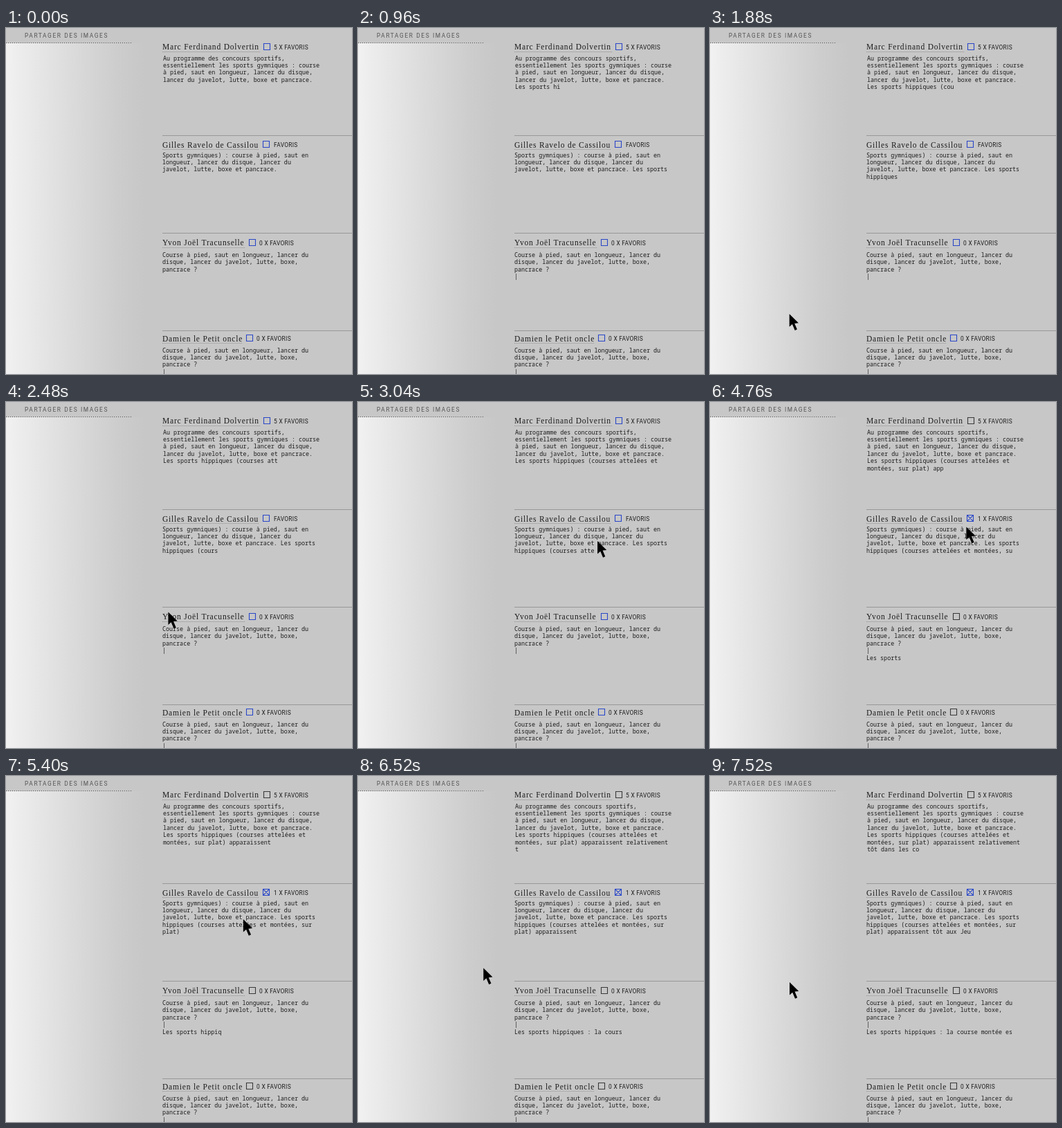
Recreate the animation shown at these times as an HTML page. Size 500x500 px, loop 7560 ms.

```html
<!DOCTYPE html>
<html lang="fr">
<head>
<meta charset="utf-8">
<style>
  html, body { margin: 0; height: 100%; overflow: hidden; background: #c7c7c7; }
  svg { display: block; width: 100vw; height: 100vh; }
  text { white-space: pre; fill: #1c1c1c; }
  .name { font: 11.5px "Liberation Serif", serif; letter-spacing: .8px; }
  .tip { font: 11px "Liberation Serif", serif; letter-spacing: .9px; }
  .label { font: 8.4px Roboto, sans-serif; letter-spacing: .3px; }
  .title { font: 8.4px Roboto, sans-serif; letter-spacing: 1.6px; fill: #555; }
  .body { font: 8.4px "Noto Sans Mono", monospace; }
  .rule { stroke: #989898; }
  .under { stroke: #909090; stroke-dasharray: 1 1; }
  .box { fill: none; stroke-width: 1.1; }
</style>
</head>
<body>
<svg viewBox="0 0 500 500">
  <defs>
    <linearGradient id="fade">
      <stop offset="0" stop-color="#f1f1f1"/>
      <stop offset=".13" stop-color="#ebebeb"/>
      <stop offset=".5" stop-color="#dadada"/>
      <stop offset=".8" stop-color="#cdcdcd"/>
      <stop offset="1" stop-color="#c7c7c7"/>
    </linearGradient>
  </defs>
  <rect y="22" width="200" height="478" fill="url(#fade)"/>
  <path d="M0 21.5H182" stroke="#555" stroke-dasharray="1 2"/>
  <text class="title" x="27" y="14">PARTAGER DES IMAGES</text>
  <g id="posts"></g>
  <g id="tip">
    <rect x="314.7" y="146.7" width="130.6" height="22.6" fill="#d6d6d6" stroke="#2040f4" stroke-width="1.4"/>
    <text class="tip" x="331" y="162.5">Favoris : Gilles R.</text>
  </g>
  <path id="pointer" d="M0 0V18.5L4.2 14.8L8 23.8L11.2 22.3L7.5 13.6L13.2 13Z"/>
</svg>
<script>
const LOOP = 7560, CLICK = 3680, TIP_END = 4680, LINE = 10.45;
const BLUE = '#2b48c8', DARK = '#3a3a3a';
const asked = 'Course à pied, saut en longueur, lancer du\ndisque, lancer du javelot, lutte, boxe,\npancrace ?';

// start and step: when typing begins and ms per character
const posts = [
  { name: 'Marc Ferdinand Dolvertin', y: 31, end: 367, box: 372.5, label: 387, count: '5 X ', x: 227, top: 46.5,
    text: 'Au programme des concours sportifs,\nessentiellement les sports gymniques : course\nà pied, saut en longueur, lancer du disque,\nlancer du javelot, lutte, boxe et pancrace.\n',
    typed: 'Les sports hippiques (courses attelées et\nmontées, sur plat) apparaissent relativement\ntôt dans les co', start: 0, step: 73.7 },
  { name: 'Gilles Ravelo de Cassilou', y: 172.5, end: 366, box: 371.5, label: 387, count: '', x: 226, top: 186.5, liked: true,
    text: 'Sports gymniques) : course à pied, saut en\nlongueur, lancer du disque, lancer du\njavelot, lutte, boxe et pancrace.',
    typed: ' Les sports\nhippiques (courses attelées et montées, sur\nplat) apparaissent tôt aux Jeu', start: 0, step: 86.8 },
  { name: 'Yvon Joël Tracunselle', y: 314, end: 346, box: 351.5, label: 366, count: '0 X ', x: 226, top: 331,
    text: asked, late: '\n|\n', typed: 'Les sports hippiques : la course montée es', start: 3865, step: 85.5 },
  { name: 'Damien le Petit oncle', y: 452.5, end: 342, box: 347.5, label: 362, count: '0 X ', x: 226, top: 468.5,
    text: asked + '\n|', typed: '', start: 0, step: 90 }
];

// pointer tip: time, x, y
const route = [
  [1450, -16, 510], [1600, 18, 486], [1880, 114.5, 413.5], [3040, 346, 201], [3500, 377, 171],
  [3680, 379, 172], [4560, 379, 172], [5400, 343, 207], [6520, 181.5, 277.5], [6860, 99, 291],
  [7100, 101, 293], [7520, 115, 298], [LOOP, 115, 298]
];

const $ = id => document.getElementById(id);
function add(tag, attrs, text = '') {
  const el = document.createElementNS('http://www.w3.org/2000/svg', tag);
  for (const key in attrs) el.setAttribute(key, attrs[key]);
  el.textContent = text;
  return $('posts').appendChild(el);
}

posts.forEach((p, i) => {
  if (i) add('path', { class: 'rule', d: `M226 ${14.5 + 141 * i}H500` });
  add('path', { class: 'under', d: `M226 ${Math.floor(p.y) + 3.5}H${p.end}` });
  add('text', { class: 'name', x: 226, y: p.y }, p.name);
  const top = Math.floor(p.y) - 8.5;
  p.square = add('path', { class: 'box' });
  p.outline = `M${p.box} ${top}h9v9h-9z`;
  p.cross = `${p.outline}l9 9m0 -9l-9 9`;
  p.likes = add('text', { class: 'label', x: p.label, y: p.y - .3 });
  p.lines = Array.from({ length: 7 }, (_, n) =>
    add('text', { class: 'body', x: p.x, y: p.top + n * LINE }));
});

function drawPost(p, t) {
  const clicked = t >= CLICK, checked = clicked && p.liked;
  p.square.setAttribute('d', checked ? p.cross : p.outline);
  p.square.setAttribute('stroke', clicked && !p.liked ? DARK : BLUE);
  p.likes.textContent = (checked ? '1 X ' : p.count) + 'FAVORIS';
  const count = Math.max(0, Math.floor((t - p.start) / p.step));
  const late = p.late && t >= 80 ? p.late : '';
  const lines = (p.text + late + p.typed.slice(0, count)).split('\n');
  p.lines.forEach((el, n) => el.textContent = lines[n] || '');
}

function pointerAt(t) {
  const i = Math.max(1, route.findIndex(k => k[0] > t));
  const [a, b] = [route[i - 1], route[i]];
  const u = Math.max(0, (t - a[0]) / (b[0] - a[0]));
  return [a[1] + (b[1] - a[1]) * u, a[2] + (b[2] - a[2]) * u];
}

const begin = performance.now();
function frame() {
  const t = (performance.now() - begin) % LOOP;
  posts.forEach(p => drawPost(p, t));
  $('tip').setAttribute('visibility', t >= CLICK && t < TIP_END ? 'visible' : 'hidden');
  $('pointer').setAttribute('transform', `translate(${pointerAt(t)})`);
  requestAnimationFrame(frame);
}
frame();
</script>
</body>
</html>
```
